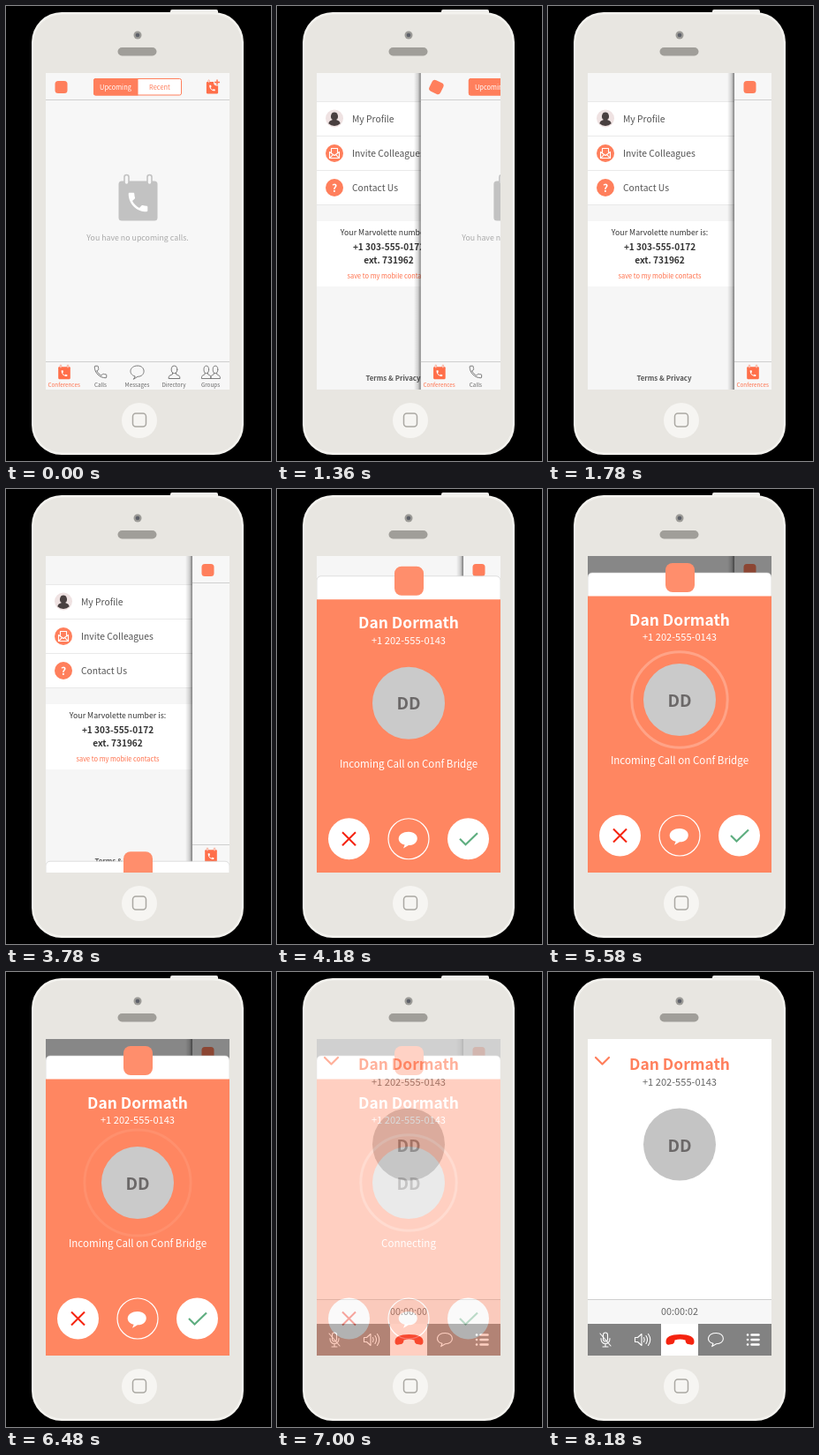
Write an HTML page that moves like this. It is 300 px wide and 516 px high and loops after 9180 ms.

```html
<!DOCTYPE html>
<html lang="en">
<head>
<meta charset="utf-8">
<title>Phone call flow</title>
<style>
  html, body { margin: 0; width: 100%; height: 100%; overflow: hidden; background: #000; }
  svg { display: block; width: 100vw; height: 100vh; }
  text { font-family: "Noto Sans CJK JP", "Noto Sans CJK SC", "Noto Sans CJK", "Open Sans", sans-serif; }
  .mid { text-anchor: middle; }
  .semi { font-weight: 600; }
  .line { fill: none; stroke: currentColor; stroke-linecap: round; stroke-linejoin: round; }
  .tab { font-size: 6.3px; fill: #666; text-anchor: middle; }
  .item { font-size: 10.3px; fill: #555; }
  .name { font-size: 17.4px; font-weight: 600; text-anchor: middle; }
  .num { font-size: 11.1px; text-anchor: middle; }
  .initials { font-size: 19px; font-weight: 600; fill: #6b6868; text-anchor: middle; }
</style>
</head>
<body>
<svg viewBox="0 0 300 516" preserveAspectRatio="none">
  <defs>
    <clipPath id="screen"><rect x="45" y="76" width="208" height="359"/></clipPath>
    <linearGradient id="shade">
      <stop offset="0" stop-color="#000" stop-opacity="0"/>
      <stop offset=".6" stop-color="#000" stop-opacity=".16"/>
      <stop offset="1" stop-color="#000" stop-opacity=".5"/>
    </linearGradient>
    <path id="handset" transform="translate(-12 -12)" d="M6.6 10.8c1.4 2.8 3.8 5.1 6.6 6.6l2.2-2.2c.3-.3.7-.4 1-.2 1.1.4 2.3.6 3.6.6.6 0 1 .4 1 1V20c0 .6-.4 1-1 1C10.6 21 3 13.4 3 4c0-.6.4-1 1-1h3.5c.6 0 1 .4 1 1 0 1.2.2 2.4.6 3.6.1.3 0 .7-.2 1z"/>
    <g id="calendar">
      <rect x="-22" y="-22" width="44" height="45" rx="3.5" fill="currentColor"/>
      <g fill="#f7f7f7" stroke="currentColor" stroke-width="1.6">
        <rect x="-15.5" y="-29" width="5" height="11" rx="2.5"/>
        <rect x="10.5" y="-29" width="5" height="11" rx="2.5"/>
      </g>
      <use href="#handset" transform="translate(0 2) scale(1.2)" fill="#fff"/>
    </g>
    <path id="bubble" d="M-3.5 5.4 C-12 3.5 -10.5 -6.5 0 -6.5 C10.5 -6.5 10.5 5.8 0 5.8 L-4.8 8.6 Z"/>
    <g id="person">
      <ellipse cx="0" cy="-3.2" rx="3.3" ry="4.2"/>
      <path d="M-2 .6 V2.2 L-5.4 3.8 Q-6.4 4.6 -6.4 7 H6.4 Q6.4 4.6 5.4 3.8 L2 2.2 V.6"/>
    </g>
  </defs>

  <rect width="300" height="516" fill="#000"/>
  <rect x="186" y="4" width="54" height="6" rx="2" fill="#f1f0ec"/>
  <rect x="29" y="7" width="240" height="502" rx="34" fill="#f3f2ee"/>
  <rect x="31.5" y="9.500" width="235" height="497" rx="32" fill="#e8e6e1"/>
  <circle cx="149" cy="33" r="4.5" fill="#9b9a96"/>
  <circle cx="149" cy="33" r="2.3" fill="#5d6068"/>
  <rect x="126.500" y="47" width="44" height="9.500" rx="4.700" fill="#a09e99"/>
  <circle cx="151" cy="470" r="20" fill="#f6f5f2"/>
  <rect x="143.500" y="462" width="15" height="15" rx="3.5" fill="none" stroke="#aaa8a3" stroke-width="1.5"/>

  <g clip-path="url(#screen)">
    <g id="menu">
      <rect x="45" y="76" width="208" height="359" fill="#f6f6f6"/>
      <rect x="45" y="108" width="208" height="117" fill="#fff"/>
      <rect x="45" y="244" width="208" height="74" fill="#fff"/>
      <path d="M45 108.500H253M45 147.500H253M45 186.500H253M45 225.500H253" stroke="#e9e9e9"/>
      <circle cx="65" cy="127.500" r="10" fill="#efe2e2"/>
      <path d="M65 120.500a4 4.600 0 0 1 2 8.600q4 1 4.700 4.200a10 10 0 0 1-13.400 0q.7-3.200 4.700-4.200a4 4.600 0 0 1 2-8.600z" fill="#494040"/>
      <g fill="#ff7f5c"><circle cx="65" cy="167" r="10"/><circle cx="65" cy="206" r="10"/></g>
      <g class="line" color="#fff" stroke-width="1.1">
        <path d="M59.500 165.500V172.500H70.500V165.500M59.500 165.500L65 169.500L70.500 165.500M61.500 166.500V161.500H68.500V166.500M59.500 172.500L63.500 168.600M70.500 172.500L66.500 168.600"/>
      </g>
      <text class="mid semi" x="65" y="210.500" font-size="12" fill="#fff">?</text>
      <text class="item" x="85" y="131.500">My Profile</text>
      <text class="item" x="85" y="170.500">Invite Colleagues</text>
      <text class="item" x="85" y="209.500">Contact Us</text>
      <text class="mid" x="126.500" y="259.500" font-size="8.75" fill="#333">Your Marvolette number is:</text>
      <g class="mid semi" font-size="10.1" fill="#333">
        <text x="126.500" y="277">+1 303-555-0172</text>
        <text x="126.500" y="292">ext. 731962</text>
      </g>
      <text class="mid" x="126.500" y="308.500" font-size="7.45" fill="#ff6f4a">save to my mobile contacts</text>
      <text class="mid semi" x="131.500" y="425" font-size="7.9" fill="#555">Terms &amp; Privacy</text>
    </g>

    <g id="panel">
      <rect x="37" y="76" width="8" height="359" fill="url(#shade)"/>
      <rect x="45" y="76" width="208" height="359" fill="#f7f7f7"/>
      <path d="M45 106.500H253M45 403.500H253" stroke="#cfcfcf"/>
      <rect id="badge" x="55.500" y="85" width="14" height="14" rx="3.5" fill="#ff7f5c"/>
      <rect x="99.500" y="82.500" width="99" height="18.500" rx="2" fill="#fff" stroke="#ff7f5c"/>
      <path d="M149.500 82H101.500Q99 82 99 84.500V99Q99 101.500 101.500 101.500H149.500Z" fill="#ff7f5c"/>
      <g class="mid" font-size="7.45">
        <text x="124" y="94.800" fill="#fff">Upcoming</text>
        <text x="174" y="94.800" fill="#ff7f5c">Recent</text>
      </g>
      <g color="#ff6f4a">
        <use href="#calendar" transform="translate(233.500 92.500) scale(.3)"/>
        <circle cx="239" cy="86.500" r="4" fill="#f7f7f7"/>
        <path d="M239 83.500V89.500M236 86.500H242" stroke="currentColor" stroke-width="1.4"/>
        <use href="#calendar" transform="translate(66 416) scale(.31)"/>
      </g>
      <use href="#calendar" transform="translate(149.500 220.500)" color="#c2c2c2"/>
      <text class="mid" x="149" y="265.500" font-size="8.8" fill="#a9a9a9">You have no upcoming calls.</text>
      <g class="line" color="#777">
        <use href="#handset" transform="translate(107 415) scale(.75)" stroke-width="1.3"/>
        <use href="#bubble" transform="translate(149 414.500) scale(.9 1)"/>
        <use href="#person" transform="translate(190.500 415.500)"/>
        <use href="#person" transform="translate(226.800 415.500) scale(.85 1)"/>
        <use href="#person" transform="translate(237 415.500) scale(.85 1)"/>
      </g>
      <text class="tab" x="65.700" y="432" style="fill:#ff6f4a">Conferences</text>
      <text class="tab" x="107" y="432">Calls</text>
      <text class="tab" x="148.500" y="432">Messages</text>
      <text class="tab" x="190" y="432">Directory</text>
      <text class="tab" x="231.500" y="432">Groups</text>
    </g>

    <rect id="dim" x="45" y="76" width="208" height="359" fill="#000"/>

    <!-- incoming call card, its top edge at y = 0 -->
    <g id="card">
      <rect x="45" y="0" width="208" height="60" rx="5" fill="#fff" stroke="#c9c9c9" stroke-width=".6"/>
      <rect x="45" y="26.500" width="208" height="340" fill="#ff8661"/>
      <rect x="133" y="-11" width="33" height="33" rx="8" fill="#ff8e6c"/>
      <text class="name" x="149" y="59.500" fill="#fff">Dan Dormath</text>
      <text class="num" x="149" y="77" fill="#fff">+1 202-555-0143</text>
      <circle id="ring" cx="149" cy="144" fill="none" stroke="#fff" stroke-width="3"/>
      <circle cx="149" cy="144" r="41" fill="#cacaca"/>
      <text class="initials" x="149" y="151.500">DD</text>
      <text id="status" class="mid" x="149" y="216.800" font-size="11.6" fill="#fff"></text>
      <circle cx="81.500" cy="298" r="23.500" fill="#fff"/>
      <circle cx="216.500" cy="298" r="23.500" fill="#fff"/>
      <circle cx="149" cy="298" r="23" fill="none" stroke="#fff" stroke-width="1.2"/>
      <path d="M74 290.500L89 305.500M89 290.500L74 305.500" stroke="#f5230f" stroke-width="2"/>
      <path d="M207 298L213.500 304.500L227 291.500" fill="none" stroke="#5fae80" stroke-width="2.2"/>
      <use href="#bubble" transform="translate(149 298) scale(1.25)" fill="#fff"/>
    </g>

    <g id="call">
      <rect x="45" y="76" width="208" height="359" fill="#fff"/>
      <path class="line" d="M54 97L61.500 104.500L69 97" color="#ff7f5c" stroke-width="2.2"/>
      <text class="name" x="149" y="111" fill="#ff7f5c">Dan Dormath</text>
      <text class="num" x="149" y="129" fill="#666">+1 202-555-0143</text>
      <circle cx="149" cy="195.500" r="41" fill="#c4c4c4"/>
      <text class="initials" x="149" y="203.500">DD</text>
      <rect x="45" y="371" width="208" height="28" fill="#f7f7f7"/>
      <path d="M45 371.500H253" stroke="#cfcfcf"/>
      <text id="timer" class="mid" x="149" y="389" font-size="10.8" fill="#666"></text>
      <path d="M45 399H128V435H45ZM170 399H253V435H170Z" fill="#828282"/>
      <path d="M133.500 419Q133.500 411 149.500 411Q165.500 411 165.500 419Q165.500 423 162.500 422.800L157.500 421.800Q155.500 421 155.500 417.500Q149.500 415.500 143.500 417.500Q143.500 421 141.500 421.800L136.500 422.800Q133.500 423 133.500 419Z" fill="#f5230f"/>
      <g class="line" color="#fff" stroke-width="1.1">
        <rect x="62.500" y="409" width="5" height="10" rx="2.500"/>
        <path d="M60 415.500Q60 421.500 65 421.500Q70 421.500 70 415.500M65 421.500V425M62 425H68M59 410L71 424"/>
        <path d="M98.500 414.500H101.500L106 410.500V423.500L101.500 419.500H98.500ZM108.500 414.500Q110 417 108.500 419.500M111 412.500Q114 417 111 421.500M113.500 410.500Q118 417 113.500 423.500"/>
        <use href="#bubble" transform="translate(190.500 416)"/>
        <path d="M230.500 411.500H238.500M230.500 417H238.500M230.500 422.500H238.500M226 411.500h.1M226 417h.1M226 422.500h.1" stroke-width="2.6"/>
      </g>
    </g>
  </g>
</svg>
<script>
  const LOOP = 9180;
  const $ = id => document.getElementById(id);
  const set = (id, attrs) => {
    for (const key in attrs) $(id).setAttribute(key, attrs[key]);
  };
  const span = (t, start, length) => Math.min(1, Math.max(0, (t - start) / length));
  const easeOut = p => 1 - (1 - p) ** 2;
  const show = (id, on) => set(id, { visibility: on ? 'visible' : 'hidden' });

  function render(t) {
    // side menu
    const open = easeOut(span(t, 1000, 780));
    set('panel', { transform: `translate(${166 * open} 0)` });
    set('badge', { transform: `rotate(${-90 * open} 62.5 92)` });

    // incoming call
    const top = 446 - 351 * easeOut(span(t, 3764, 464));
    show('card', t >= 3780);
    set('card', { transform: `translate(0 ${top})` });
    set('dim', { opacity: 0.45 * span(t, 4180, 500) });

    const pulse = Math.max(0, t - 4444) / 710 % 1;
    set('ring', { r: 41 + 22 * pulse, opacity: t < 4444 ? 0 : 0.6 * (1 - pulse) });
    $('status').textContent = t < 6540 ? 'Incoming Call on Conf Bridge' : 'Connecting';

    // call in progress
    set('call', { opacity: span(t, 6720, 460) });
    const seconds = t < 7180 ? 0 : t < 8180 ? 1 : 2;
    $('timer').textContent = '00:00:0' + seconds;
  }

  let begin = null;
  function tick(now) {
    if (begin === null) begin = now;
    render((now - begin) % LOOP);
    requestAnimationFrame(tick);
  }
  render(0);
  requestAnimationFrame(tick);
</script>
</body>
</html>
```
